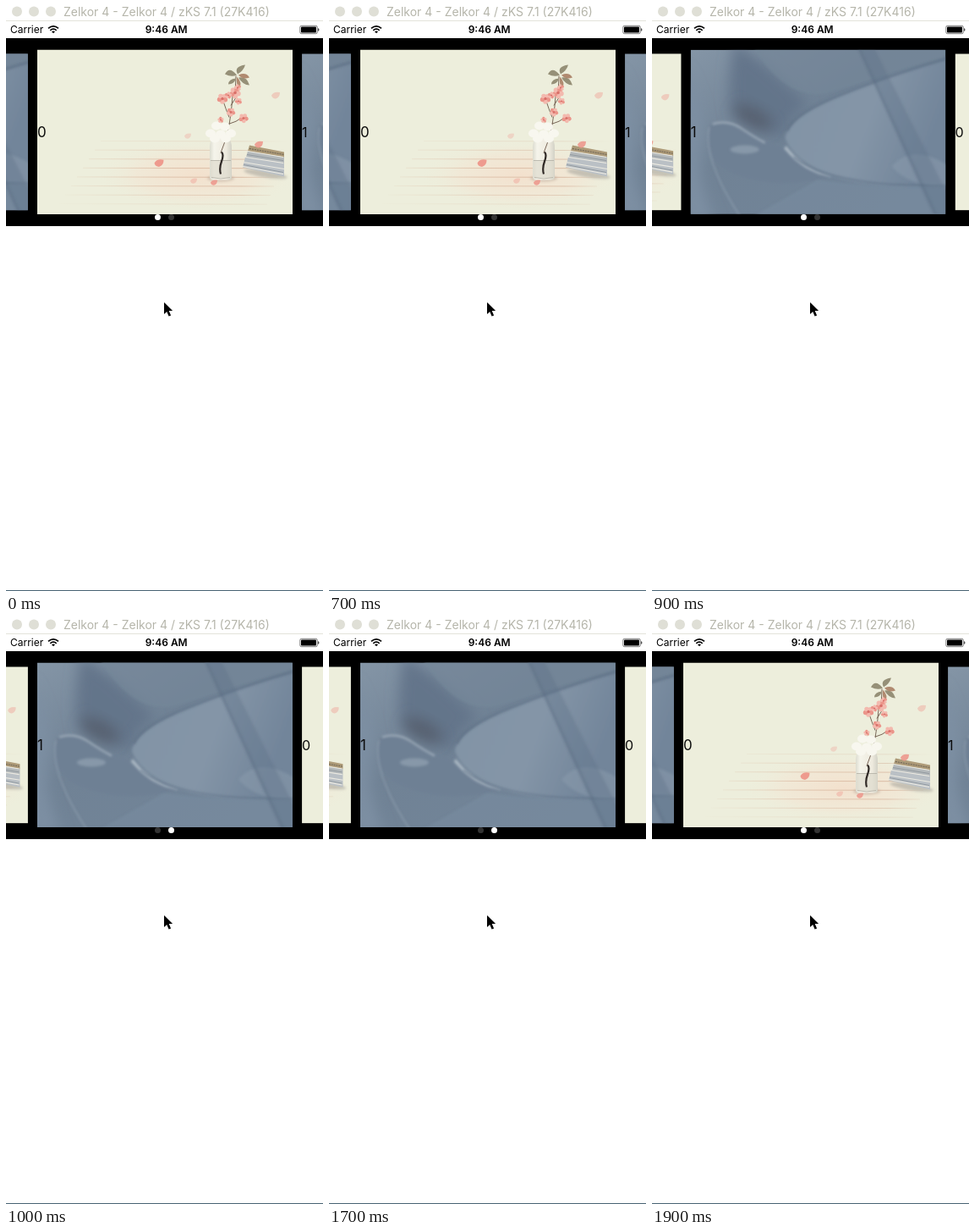
Write an HTML page that moves like this. It is 375 px wide and 691 px high and loops after 2000 ms.

```html
<!DOCTYPE html>
<html lang="en">
<head>
<meta charset="utf-8">
<title>Carousel</title>
<style>
  html, body { margin: 0; width: 100%; height: 100%; overflow: hidden; background: #fff; }
  svg { display: block; width: 100%; height: 100%; }
  text { font-family: Inter, Roboto, sans-serif; }
  .label { font-size: 17px; fill: #0b0b0b; }
  .soft { filter: url(#blur2); }
  .softer { filter: url(#blur8); }
</style>
</head>
<body>
<svg viewBox="0 0 375 691">
  <defs>
    <clipPath id="cardClip"><rect width="302" height="194.5"/></clipPath>
    <filter id="blur2" x="-30%" y="-30%" width="160%" height="160%"><feGaussianBlur stdDeviation="1.5"/></filter>
    <filter id="blur8" x="-50%" y="-50%" width="200%" height="200%"><feGaussianBlur stdDeviation="8"/></filter>
    <radialGradient id="table">
      <stop offset="0" stop-color="#f5dcc8" stop-opacity=".75"/>
      <stop offset=".6" stop-color="#f4e3d1" stop-opacity=".5"/>
      <stop offset="1" stop-color="#edeedc" stop-opacity="0"/>
    </radialGradient>
    <linearGradient id="plank" gradientUnits="userSpaceOnUse" x1="15" x2="298" y1="0" y2="0">
      <stop offset="0" stop-color="#d8b59c" stop-opacity="0"/>
      <stop offset=".45" stop-color="#d8b59c" stop-opacity=".7"/>
      <stop offset=".8" stop-color="#cfa88f" stop-opacity=".7"/>
      <stop offset="1" stop-color="#d8b59c" stop-opacity="0"/>
    </linearGradient>
    <linearGradient id="glass">
      <stop offset="0" stop-color="#dcdcd0"/>
      <stop offset=".2" stop-color="#f5f4eb"/>
      <stop offset=".75" stop-color="#eeeade"/>
      <stop offset="1" stop-color="#d2d1c6"/>
    </linearGradient>
    <linearGradient id="steel" x1="0" y1="0" x2="1" y2="1">
      <stop offset="0" stop-color="#8495a6"/>
      <stop offset=".4" stop-color="#708295"/>
      <stop offset="1" stop-color="#73869a"/>
    </linearGradient>
    <linearGradient id="dome" x1="0" y1="0" x2="1" y2=".3">
      <stop offset="0" stop-color="#8193a5"/>
      <stop offset=".6" stop-color="#8495a7"/>
      <stop offset="1" stop-color="#72859a"/>
    </linearGradient>

    <g id="card0" clip-path="url(#cardClip)">
      <rect width="302" height="195" fill="#edeedc"/>
      <ellipse cx="190" cy="148" rx="120" ry="42" fill="url(#table)"/>
      <g id="planks" stroke="url(#plank)" fill="none"/>
      <ellipse cx="270" cy="147" rx="26" ry="4" transform="rotate(9 270 147)" fill="#a8a59c" opacity=".6" class="soft"/>
      <path d="M251 113l41 8v6l-43-7z" fill="#ad9a78"/>
      <path d="M249 120l43 7v7l-45-7z" fill="#b4b9bb"/>
      <path d="M246 127l46 7v16l-49-11z" fill="#bac0c5"/>
      <path d="M249 120l42 7M246 127l45 7M244 133l48 8M243 138l48 9" stroke="#eceae2" stroke-width="1.2"/>
      <path d="M251 117l41 7" stroke="#6c6354" stroke-dasharray="2 1"/>
      <path d="M248 124l43 7M244 136l47 9" stroke="#838b92" stroke-width=".7"/>
      <ellipse cx="217" cy="152" rx="16" ry="4" fill="#b9a696" opacity=".5" class="soft"/>
      <path d="M208 104h18q4 4 4 12v34q0 4-4 4h-18q-4 0-4-4v-34q0-8 4-12z" fill="url(#glass)"/>
      <path d="M205 131h24v18q0 3-3 3h-18q-3 0-3-3z" fill="#dedacd" opacity=".65"/>
      <path d="M205 131h24M206 151q11 3 22 0" fill="none" stroke="#b1afa4" stroke-width=".8"/>
      <path d="M217 122q7-16 10-33t4-34q5-12 4-24M226 88q9-2 18-9M229 66q7-8 8-18M227 80q-4-10-7-19"
        fill="none" stroke="#6b5748" stroke-width=".9"/>
      <path d="M217 147q-2-7 1-15t0-11" fill="none" stroke="#302a26" stroke-width="2.2"/>
      <g id="whiteFlowers" fill="#f8f7ef"/>
      <g fill="#969078">
        <path d="M236 30q-9-11-14-1 8 4 14 1zM237 29q-5-9 9-11-2 7-9 11zM238 33q10-2 13 9-8 0-13-9zM235 34q-9 1-9 7 7 0 9-7z"/>
        <path d="M236 32q-1 10 3 14 4-7-3-14zM238 30q9-4 13 3-8 3-13-3z" fill="#b08a70"/>
      </g>
      <g id="blossoms"/>
      <g id="petals"/>
      <text class="label" x="0" y="103.7">0</text>
    </g>

    <g id="card1" clip-path="url(#cardClip)">
      <rect width="302" height="195" fill="url(#steel)"/>
      <path d="M-10 20Q20 70 12 110T30 205H-10z" fill="#7d8fa3" class="softer"/>
      <path d="M52-10Q42 45 48 76L108 106Q116 78 140 64L92 20z" fill="#63748a" class="softer"/>
      <ellipse cx="74" cy="80" rx="25" ry="11" transform="rotate(28 74 80)" fill="#566170" class="softer"/>
      <path d="M70-10Q110 60 160 52L302 10V-10z" fill="#748799" opacity=".7" class="soft"/>
      <path d="M112 104Q116 80 170 56T302 12V164Q200 166 150 142Q118 124 112 104z" fill="url(#dome)" class="soft"/>
      <path d="M114 96Q122 76 176 54T304 10" fill="none" stroke="#5f7186" stroke-width="3" opacity=".8" class="soft"/>
      <path d="M24 88Q42 84 60 94T110 116Q135 143 165 150Q110 166 60 150T24 88z" fill="#6e8094" class="soft"/>
      <ellipse cx="64" cy="118" rx="17" ry="5" fill="#8798a9" class="soft"/>
      <path d="M26 88Q44 82 60 93T88 110" fill="none" stroke="#a0aebb" stroke-width="2" class="soft"/>
      <path d="M113 114Q132 140 166 150Q134 145 111 117z" fill="#acb9c4" stroke="#9eacba" class="soft"/>
      <path d="M122 127Q170 164 302 160" fill="none" stroke="#617388" stroke-width="1.5" class="soft"/>
      <path d="M150 154Q220 164 302 162V205H60Z" fill="#778a9e" opacity=".8" class="soft"/>
      <path d="M238 138Q262 110 304 136V160Q260 164 238 138z" fill="#8b9cad" opacity=".5" class="soft"/>
      <path d="M197-5h19L306 174V205H292z" fill="#5d7086" opacity=".35" class="soft"/>
      <path d="M198-5L293 200" stroke="#5a6d82" stroke-width="2" opacity=".5" class="soft"/>
      <path d="M22 92Q14 132 62 202" fill="none" stroke="#92a2b2" stroke-width="1.6" opacity=".7" class="soft"/>
      <text class="label" x="0" y="103.7">1</text>
    </g>
  </defs>

  <rect width="375" height="691" fill="#fff"/>
  <g fill="#dfdfd6">
    <circle cx="13" cy="6.5" r="6"/><circle cx="33" cy="6.5" r="6"/><circle cx="53" cy="6.5" r="6"/>
  </g>
  <text x="68" y="11.5" font-size="14" fill="#b5b5aa">Zelkor 4 - Zelkor 4 / zKS 7.1 (27K416)</text>
  <path d="M0 17.5H375" stroke="#e3e3da"/>

  <text x="5" y="32" font-size="12">Carrier</text>
  <g fill="none" stroke="#000" stroke-width="1.7">
    <path d="M50 26.3Q56 21.3 62 26.3M52.3 28.8Q56 25.6 59.7 28.8"/>
    <path d="M54 30.2Q56 28.6 58 30.2L56 32.3z" fill="#000" stroke="none"/>
  </g>
  <text x="189.7" y="32" font-size="12" font-weight="600" text-anchor="middle">9:46 AM</text>
  <rect x="347.8" y="23.3" width="20.5" height="9.4" rx="1.8" fill="none" stroke="#000" stroke-width=".5"/>
  <rect x="349" y="24.5" width="18" height="7" rx=".8"/>
  <path d="M369.3 26q2.2 2 0 4z"/>

  <rect y="38" width="375" height="222"/>
  <g id="track"></g>
  <circle class="dot" cx="179.5" cy="249.5" r="3.5"/>
  <circle class="dot" cx="195.5" cy="249.5" r="3.5"/>

  <path d="M187 350v14l3.2-3 2.4 5.5 2.5-1.1-2.4-5.3h4.4z"/>
  <path d="M0 690.5H375" stroke="#486373"/>
</svg>

<script>
  const $ = id => document.getElementById(id);

  function add(parent, tag, attrs) {
    const node = document.createElementNS('http://www.w3.org/2000/svg', tag);
    for (const name in attrs) node.setAttribute(name, attrs[name]);
    return parent.appendChild(node);
  }

  for (let i = 0; i < 8; i++) {
    const y = 108 + i * 10.6;
    add($('planks'), 'path', {
      d: `M${75 - i * 7} ${y}L${300 - i * 4} ${y + 0.5}`,
      'stroke-opacity': Math.sin((i + 1) / 9 * Math.PI)
    });
  }

  const whites = [[205, 99], [212, 90], [222, 91], [229, 99], [217, 100], [210, 105], [223, 105]];
  whites.forEach(([cx, cy]) => add($('whiteFlowers'), 'ellipse', { cx, cy, rx: 6, ry: 5 }));

  // A blossom is five round petals about a pale heart.
  function blossom(x, y, r) {
    for (let i = 0; i < 5; i++) {
      const angle = i * Math.PI * 0.4 + x;
      add($('blossoms'), 'circle', {
        cx: x + Math.cos(angle) * r * 0.6, cy: y + Math.sin(angle) * r * 0.6,
        r: r * 0.45, fill: i % 2 ? '#eb958a' : '#f3b9ae'
      });
    }
    add($('blossoms'), 'circle', { cx: x, cy: y, r: r * 0.28, fill: '#d9716a' });
  }
  [[234, 51, 6.5], [219, 58, 6], [237, 45, 4], [238, 61, 4], [226, 54, 4], [244, 81, 5.5], [229, 74, 5], [217, 83, 3.5]]
    .forEach(flower => blossom(...flower));

  [[144, 134, 5.5, 1], [262, 112, 5, 0.9], [282, 54, 5, 0.4], [178, 102, 4, 0.3], [209, 157, 4, 0.9], [185, 155, 4, 0.4]]
    .forEach(([x, y, size, opacity]) => add($('petals'), 'path', {
      d: 'M-1 0Q-.5-1 1-.7Q1 .5 0 .8Q-.8 .8-1 0z', fill: '#ee9a8e', opacity,
      transform: `translate(${x} ${y}) scale(${size})`
    }));

  const PITCH = 305.5, CENTER_X = 188, CENTER_Y = 148.75;
  const LOOP = 2000, STEP = 100, SLIDE = 150;
  const SLIDE_STARTS = [766, 1737];

  const cards = [-1, 0, 1, 2, 3].map(index => ({
    index, node: add($('track'), 'use', { href: `#card${Math.abs(index % 2)}` })
  }));
  const dots = document.querySelectorAll('.dot');

  const clamp = v => Math.min(1, Math.max(0, v));
  const ease = p => (1 - Math.cos(Math.PI * p)) / 2;

  function draw(time) {
    const progress = SLIDE_STARTS.map(start => clamp((time - start) / SLIDE));
    const page = progress.reduce((sum, p) => sum + ease(p), 0);
    for (const { index, node } of cards) {
      const distance = index - page;
      const scale = 1 - 0.05 * Math.min(1, Math.abs(distance));
      node.setAttribute('transform',
        `translate(${CENTER_X + distance * PITCH} ${CENTER_Y}) scale(${scale}) translate(-151 -97.25)`);
    }
    // The page dot moves only once a slide has come to rest.
    const current = progress.filter(p => p === 1).length % 2;
    dots.forEach((dot, i) => dot.setAttribute('fill', i === current ? '#fff' : '#333'));
  }

  const origin = performance.now();
  function tick() {
    const elapsed = (performance.now() - origin) % LOOP;
    draw(Math.floor(elapsed / STEP) * STEP);
    requestAnimationFrame(tick);
  }
  tick();
</script>
</body>
</html>
```
